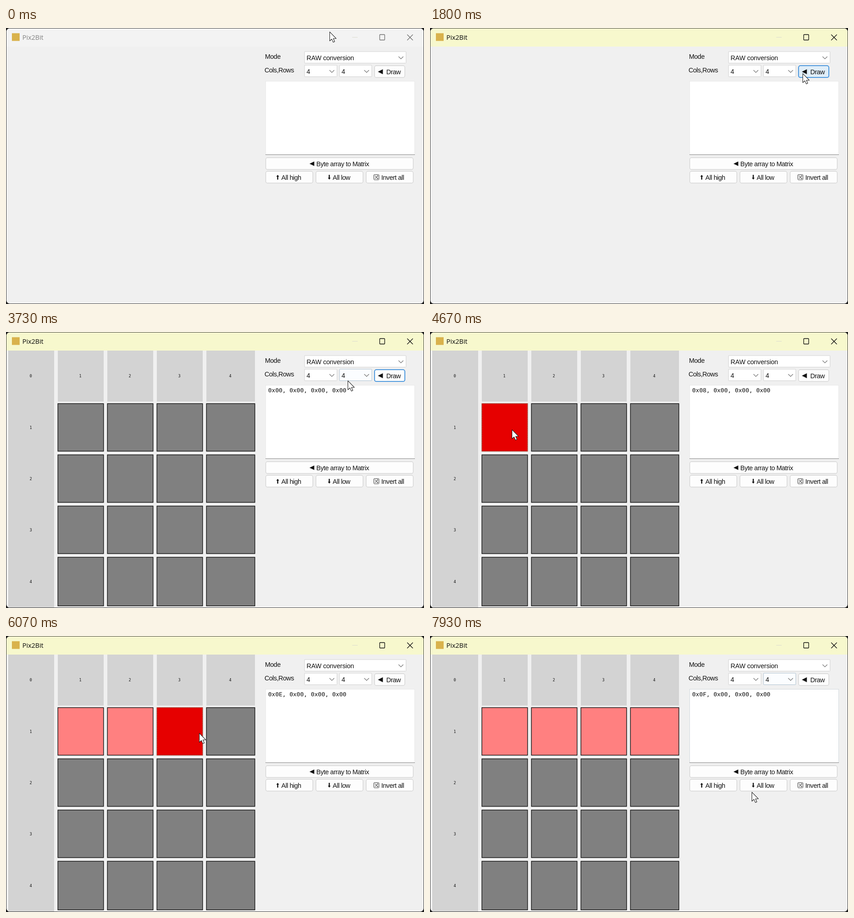
These frames come from a looping animation (920 by 609 pixels, 8 s). An HTML page:

```html
<!DOCTYPE html>
<html lang="en">
<head>
<meta charset="utf-8">
<title>Pix2Bit</title>
<style>
  html, body { margin: 0; width: 100%; height: 100%; overflow: hidden; background: #1c1c1c; }
  svg { display: block; width: 100%; height: 100%; }
  text { font: 14.4px "Liberation Sans", Arial, sans-serif; letter-spacing: -.44px; fill: #111; }
  .wide { letter-spacing: -.16px; }
  .title { font: 14.5px "Open Sans", sans-serif; letter-spacing: 0; }
  .code { font: 13px "DejaVu Sans Mono", monospace; letter-spacing: 0; white-space: pre; }
  .num { font: 8.5px "DejaVu Sans Mono", monospace; letter-spacing: 0; text-anchor: middle; }
  .line { fill: none; }
</style>
</head>
<body>
<svg id="stage" viewBox="0 0 920 609"></svg>
<script>
const FPS = 15, FRAMES = 120;
const DRAWN = 30;                  // grid appears
const CLICKS = [67, 78, 89, 98];   // cells of the first row switched on
const stage = document.getElementById('stage');

// Pointer path: frame, x, y
const PATH = [
  [1, 712, 8], [2, 714, 11], [5, 738, 34], [8, 772, 56], [13, 806, 76],
  [14, 812, 97], [15, 813, 97], [18, 818, 101], [20, 820, 100], [55, 820, 100],
  [56, 752, 107], [58, 668, 138], [62, 440, 190], [66, 190, 215], [67, 170, 216],
  [69, 170, 216], [70, 180, 215], [76, 262, 211], [78, 270, 210], [81, 270, 210],
  [82, 322, 208], [83, 360, 211], [85, 403, 215], [89, 403, 215], [91, 425, 214],
  [96, 498, 217], [97, 508, 219], [101, 508, 219], [102, 528, 228],
  [105, 640, 318], [108, 735, 318], [111, 782, 200], [114, 789, 92],
  [115, 770, 150], [117, 722, 310], [119, 708, 344]
];

function add(tag, attrs, parent = stage) {
  const el = document.createElementNS('http://www.w3.org/2000/svg', tag);
  set(el, attrs);
  parent.append(el);
  return el;
}
function set(el, attrs) {
  for (const k in attrs) el.setAttribute(k, attrs[k]);
}
const rect = (x, y, width, height, fill, more, parent) =>
  add('rect', { x, y, width, height, fill, ...more }, parent);
const path = (d, more, parent) => add('path', { d, ...more }, parent);
function label(x, y, str, cls = '', parent) {
  const el = add('text', { x, y, class: cls }, parent);
  el.textContent = str;
  return el;
}
const clamp = v => Math.max(0, Math.min(1, v));
const mix = (a, b, k) => `rgb(${a.map((v, i) => Math.round(v + (b[i] - v) * k))})`;

// Window frame and title bar
rect(.5, .5, 919, 608, '#f0f0f0', { rx: 8, stroke: '#3c3c3c' });
const bar = path('M1 41V9Q1 1 9 1H911Q919 1 919 9V41Z');
rect(13, 11.5, 17, 17, '#d9b24c');
const title = label(36, 26, 'Pix2Bit', 'title');
path('M762 20.5H774', { stroke: '#dcdcd0' });
const sysButtons = path('M823.5 14.5H832.5Q833.5 14.5 833.5 15.5V25.5Q833.5 26.5 832.5 26.5H823.5Q822.5 26.5 822.5 25.5V15.5Q822.5 14.5 823.5 14.5ZM883 14.5L895.5 27M895.5 14.5L883 27',
  { class: 'line', 'stroke-width': 1.3 });

// Matrix
const grid = add('g', {});
const colX = c => 5 + 109 * c, rowY = r => 45 + 113 * r;
const colW = c => c === 4 ? 107 : 101;
rect(5, 41, 101, 567, '#d3d3d3', {}, grid);
label(54.5, 100, '0', 'num', grid);
const firstRow = [];
for (let i = 1; i <= 4; i++) {
  rect(colX(i), 41, colW(i), 112.5, '#d3d3d3', {}, grid);
  label(colX(i) + colW(i) / 2 - 1, 100, i, 'num', grid);
  label(54.5, 100.5 + 113.3 * i, i, 'num', grid);
  for (let c = 1; c <= 4; c++) {
    const cell = rect(colX(c) + .2, rowY(i), colW(c) - .5, i === 4 ? 107.4 : 105, '#808080',
      { stroke: '#111', 'stroke-width': 1.4 }, grid);
    if (i === 1) firstRow.push(cell);
  }
}
const focusRing = rect(0, 158, 0, 105, 'none', { stroke: '#ff9c80', 'stroke-dasharray': '1 1.5' }, grid);

// Right-hand panel
label(570, 68, 'Mode');
label(569, 98, 'Cols,Rows');

function combo(x, y, w, h, str) {
  const box = rect(x + .5, y + .5, w - 1, h - 1, '#fff', { rx: 1 });
  label(x + 5, y + 19, str, 'wide');
  path(`M${x + w - 17} ${y + 11.5}l5.2 5.2 5.2-5.2`, { class: 'line', stroke: '#777', 'stroke-width': 1.3 });
  return { box, x, y, w, h };
}
const combos = [
  combo(656.5, 51.5, 224.5, 26.5, 'RAW conversion'),
  combo(656.5, 81.5, 72.5, 26.5, '4'),
  combo(733.5, 81.5, 72, 26.5, '4')
];

const field = { x: 571, y: 117, w: 329, h: 163 };
field.box = rect(571.5, 117.5, 328, 162, '#fff', { stroke: '#e8e8e8' });
path('M571 279.5H900', { stroke: '#858585' });
const bytes = label(577, 133, '', 'code');

function button(x, y, w, str, textX) {
  const box = rect(x + .7, y + .7, w - 1.4, 26, '#fdfdfd', { rx: 4 });
  label(textX, y + 19, str);
  return { box, x, y, w, h: 27 };
}
const draw = button(810.5, 82.5, 68, 'Draw', 837);
const buttons = [
  draw,
  button(571, 285.5, 326, 'Byte array to Matrix', 683),
  button(571, 315.5, 105, 'All high', 606),
  button(681.5, 315.5, 105, 'All low', 719),
  button(792, 315.5, 105, 'Invert all', 826)
];
path('M818.5 96.5L829.5 91V102ZM668 299.5L678.5 294.5V304.5Z', { fill: '#111' });
path('M598 324l3 4h-1.8v6.5h-2.4V328H595ZM711.5 334.5l3-4h-1.8V324h-2.4v6.5H708.5Z', { fill: '#111' });
rect(809.5, 323.5, 11.5, 11.5, '#f4f4f4', { rx: 1.5, stroke: '#444' });
path('M811.5 326.5h1.5l4 5.5h2M811.5 332h1.5l4-5.5h2M817.5 325l1.7 1.5-1.7 1.5M817.5 330.5l1.7 1.5-1.7 1.5',
  { class: 'line', stroke: '#333', 'stroke-width': .9 });

const pointer = path('M.5.7V20.5L5 16.4 8.1 23.4 11.4 22 8.4 15.2H14.7Z',
  { fill: '#fff', stroke: '#222', 'stroke-width': 1.1, 'stroke-linejoin': 'round' });

function pointerAt(f) {
  const i = PATH.findIndex(p => p[0] >= f);
  if (i <= 0) return PATH[0].slice(1);
  const [f0, x0, y0] = PATH[i - 1], [f1, x1, y1] = PATH[i];
  const k = (f - f0) / (f1 - f0);
  return [x0 + (x1 - x0) * k, y0 + (y1 - y0) * k];
}
function over(r, f) {
  const [x, y] = pointerAt(f);
  return x >= r.x && x < r.x + r.w && y >= r.y && y < r.y + r.h;
}
// Hover strength, fading over six frames
function glow(r, f) {
  let n = 0;
  for (let i = 0; i < 6; i++) n += over(r, f - i);
  return clamp(n / 4);
}

function render(f) {
  const [x, y] = pointerAt(f);
  set(pointer, { transform: `translate(${x.toFixed(1)} ${y.toFixed(1)})` });

  const active = clamp((f - 23) / 3);
  set(bar, { fill: mix([243, 243, 243], [247, 248, 205], active) });
  title.style.fill = mix([130, 130, 130], [10, 10, 10], active);
  set(sysButtons, { stroke: mix([110, 110, 110], [10, 10, 10], active) });

  for (const c of combos) {
    const k = glow(c, f);
    set(c.box, {
      fill: mix([255, 255, 255], [238, 247, 253], k),
      stroke: mix([208, 208, 208], [75, 150, 212], k)
    });
  }
  set(field.box, { stroke: mix([232, 232, 232], [190, 200, 210], glow(field, f)) });

  for (const b of buttons) {
    const hot = over(b, f);
    const ring = hot || (b === draw && f >= 23 && f < CLICKS[0]);
    set(b.box, {
      fill: hot ? '#e0eef9' : '#fdfdfd',
      stroke: ring ? '#3a8edb' : '#cfcfcf',
      'stroke-width': ring ? 1.8 : 1.2
    });
  }

  set(grid, { visibility: f >= DRAWN ? 'visible' : 'hidden' });
  let value = 0, focus = 0;
  firstRow.forEach((cell, i) => {
    const c = i + 1, on = f >= CLICKS[i];
    const hot = on && over({ x: colX(c), y: 158, w: colW(c), h: 105 }, f);
    if (on) value |= 8 >> i;
    if (hot) focus = c;
    set(cell, {
      fill: hot ? '#e60000' : on ? '#ff8080' : '#808080',
      stroke: hot ? '#8e1a10' : '#111'
    });
  });
  set(focusRing, {
    x: colX(focus) + .2, width: colW(focus) - .5,
    'stroke-opacity': focus ? 1 : 0
  });
  bytes.textContent = f < DRAWN ? '' : `0x0${value.toString(16).toUpperCase()}, 0x00, 0x00, 0x00`;
}

const start = performance.now();
function tick() {
  const ms = performance.now() - start;
  render(Math.floor((ms + 5) * FPS / 1000) % FRAMES);
  requestAnimationFrame(tick);
}
tick();
</script>
</body>
</html>
```
